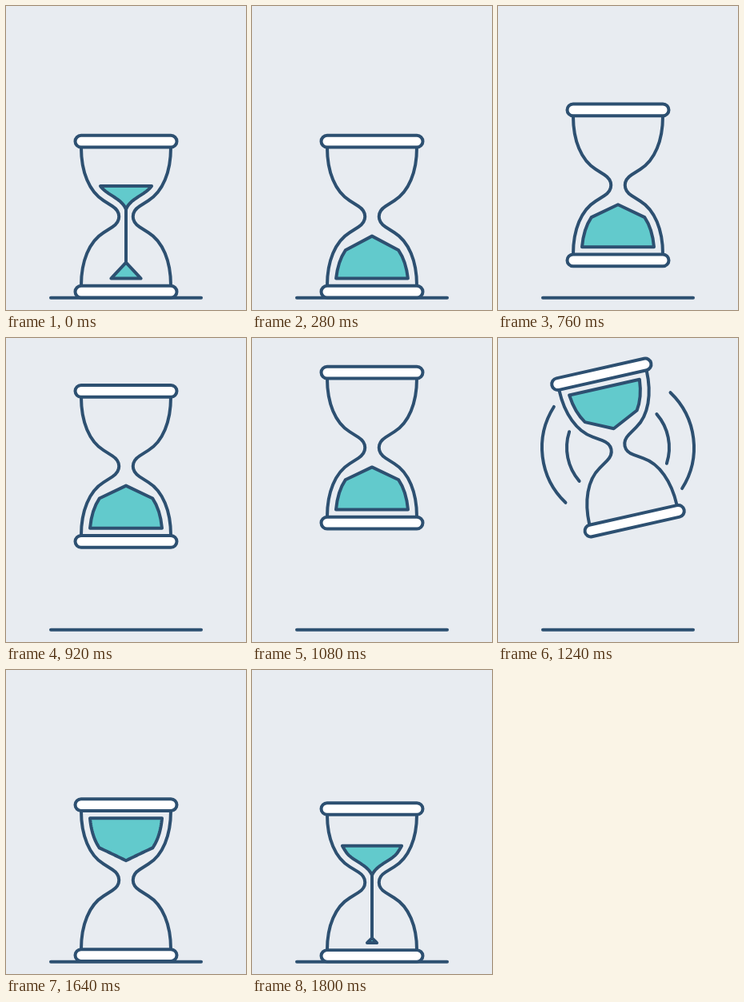
Write an HTML page with a canvas that moves like this. It is 300 px wide and 380 px high and loops after 1.84 s.

```html
<!DOCTYPE html>
<html lang="en">
<head>
<meta charset="utf-8">
<title>Hourglass</title>
<style>
  html, body { margin: 0; width: 100%; height: 100%; overflow: hidden; background: #e8ecf1; }
  canvas { display: block; width: 300px; height: 380px; }
</style>
</head>
<body>
<canvas id="stage"></canvas>
<script>
const LOOP = 1840, STEP = 40;
const INK = '#2d5071', SAND = '#62cacc', PAPER = '#e8ecf1';
const CX = 150, GROUND = 364.7, HALF = 101.5, LIFT = 126.2;
const RAD = Math.PI / 180;

const canvas = document.getElementById('stage');
const ctx = canvas.getContext('2d');
const ratio = window.devicePixelRatio || 1;
canvas.width = 300 * ratio;
canvas.height = 380 * ratio;

const clamp = x => Math.min(1, Math.max(0, x));
const mix = (a, b, k) => a + (b - a) * k;
const span = (t, a, b) => clamp((t - a) / (b - a));

// Linear interpolation through [time, value] pairs.
function track(keys, t) {
  if (t <= keys[0][0]) return keys[0][1];
  for (let i = 1; i < keys.length; i++) {
    const [t0, v0] = keys[i - 1], [t1, v1] = keys[i];
    if (t <= t1) return mix(v0, v1, (t - t0) / (t1 - t0));
  }
  return keys[keys.length - 1][1];
}

const SQUASH = [[560, 1], [600, .968], [640, .938], [680, .95], [700, 1],
  [1640, 1], [1680, .932], [1720, .942], [1760, .958], [1800, .978], [1840, 1]];
const TURN = [[1080, 0], [1120, 13.3], [1160, 59], [1200, 121], [1240, 167.3], [1280, 180]];
const OUTER_TAIL = [[1200, -66], [1240, -46.4], [1280, 4], [1320, 40]];
const OUTER_HEAD = [[1200, -12], [1240, 32.5], [1280, 40]];
const INNER_TAIL = [[1200, -58], [1240, -40.9], [1280, -2], [1320, 24]];
const INNER_HEAD = [[1200, -18], [1240, 18], [1280, 24]];

function height(t) {
  if (t < 1260) return LIFT * (1 - (1 - span(t, 692, 1092)) ** 2);
  return LIFT * (1 - span(t, 1260, 1641) ** 2);
}

function line(...pts) {
  ctx.beginPath();
  pts.forEach(([x, y]) => ctx.lineTo(x, y));
  ctx.stroke();
}

function cap(y) {
  ctx.beginPath();
  ctx.roundRect(-63.5, y - 7.4, 127, 14.8, 7.4);
  ctx.fillStyle = '#fff';
  ctx.fill();
  ctx.stroke();
}

function glass() {
  for (const s of [-1, 1]) {
    ctx.beginPath();
    ctx.moveTo(s * 56, -86);
    ctx.bezierCurveTo(s * 56, -56, s * 46, -31, s * 28, -20);
    ctx.lineTo(s * 17, -13);
    ctx.bezierCurveTo(s * 6, -6, s * 6, 6, s * 17, 13);
    ctx.lineTo(s * 28, 20);
    ctx.bezierCurveTo(s * 46, 31, s * 56, 56, s * 56, 86);
    ctx.stroke();
  }
  cap(-94);
  cap(94);
}

function fillSand() {
  ctx.closePath();
  ctx.fillStyle = SAND;
  ctx.fill();
  ctx.stroke();
}

// Lower heap: starts as a triangle, its shoulders round out as it grows.
function pile(size, round) {
  const w = 45 * size, h = 53 * (size - .17 * size * (1 - size));
  const y = k => 77.3 - h * k;
  const bend = [mix(.86, .955, round) * w, y(mix(.14, .43, round))];
  const shoulder = [.74 * w, y(mix(.26, .70, round))];
  ctx.beginPath();
  ctx.moveTo(-w, y(0));
  ctx.quadraticCurveTo(-bend[0], bend[1], -shoulder[0], shoulder[1]);
  ctx.lineTo(0, y(1));
  ctx.lineTo(shoulder[0], shoulder[1]);
  ctx.quadraticCurveTo(bend[0], bend[1], w, y(0));
  fillSand();
  return y(1);
}

// Right side of the upper sand, sampled from the rim down to the tip.
function sideCurve(funnel) {
  const pts = [];
  for (let i = 0; i <= 16; i++) {
    const k = i / 16, j = 1 - k;
    pts.push([j * j * 45 + 2 * j * k * 43 + k * k * 33.3,
      -77.3 * j * j - 2 * j * k * 54.5 - k * k * 40.2]);
  }
  const b = [[33.3, -40.2], [mix(22, 26, funnel), mix(-35, -27, funnel)],
    [mix(11, 6, funnel), mix(-29.6, -24, funnel)], [0, mix(-24.3, -9, funnel)]];
  for (let i = 1; i <= 20; i++) {
    const k = i / 20, j = 1 - k;
    const c = [j ** 3, 3 * j * j * k, 3 * j * k * k, k ** 3];
    pts.push([0, 1].map(d => c.reduce((sum, f, n) => sum + f * b[n][d], 0)));
  }
  return pts;
}

function upperSand(level, funnel) {
  const all = sideCurve(funnel);
  const first = all.findIndex(p => p[1] > level);
  if (first < 0) return;
  const side = all.slice(first);
  if (first > 0) {
    const a = all[first - 1], b = all[first];
    side.unshift([mix(a[0], b[0], (level - a[1]) / (b[1] - a[1])), level]);
  }
  ctx.beginPath();
  side.forEach(([x, y]) => ctx.lineTo(x, y));
  side.reverse().forEach(([x, y]) => ctx.lineTo(-x, y));
  fillSand();
}

function sand(t) {
  if (t >= 600 && t < 1280) {
    pile(1, 1);
    return;
  }
  const f = t < 600 ? t + LOOP : t;
  const level = -77.3 + .2125 * Math.max(0, f - 1656);
  const top = f > 1784
    ? pile(1 - (1 - span(f, 1784, 2200)) ** 3.7, 1 - (1 - span(f, 1840, 2200)) ** 1.7)
    : 77.3;
  const head = Math.min(top, mix(-9, 77.3, span(f, 1690, 1785)));
  const tail = mix(-9, 77.3, span(f, 1976, 2080));
  if (f > 1690 && tail < head) line([0, tail], [0, head]);
  upperSand(level, span(f, 1656, 1770));
}

function swoosh(t) {
  if (t < 1200 || t >= 1320) return;
  const arcs = [[95, OUTER_TAIL, OUTER_HEAD], [64, INNER_TAIL, INNER_HEAD]];
  for (const [r, tail, head] of arcs) {
    for (const flip of [0, 180]) {
      ctx.beginPath();
      ctx.arc(CX, GROUND - HALF - LIFT, r,
        (track(tail, t) + flip) * RAD, (track(head, t) + flip) * RAD);
      ctx.stroke();
    }
  }
}

function draw(t) {
  ctx.setTransform(ratio, 0, 0, ratio, 0, 0);
  ctx.fillStyle = PAPER;
  ctx.fillRect(0, 0, 300, 380);
  ctx.strokeStyle = INK;
  ctx.lineWidth = 4;
  ctx.lineCap = ctx.lineJoin = 'round';

  line([56, GROUND], [244, GROUND]);
  swoosh(t);

  ctx.translate(CX, GROUND - height(t));
  ctx.scale(1, track(SQUASH, t));
  ctx.translate(0, -HALF);
  // Once turned over, the glass is redrawn upright with its sand on top.
  if (t < 1280) ctx.rotate(track(TURN, t) * RAD);
  glass();
  sand(t);
}

const start = performance.now();
function tick() {
  const t = (performance.now() - start) % LOOP;
  draw(Math.floor(t / STEP) * STEP);
  requestAnimationFrame(tick);
}
tick();
</script>
</body>
</html>
```
